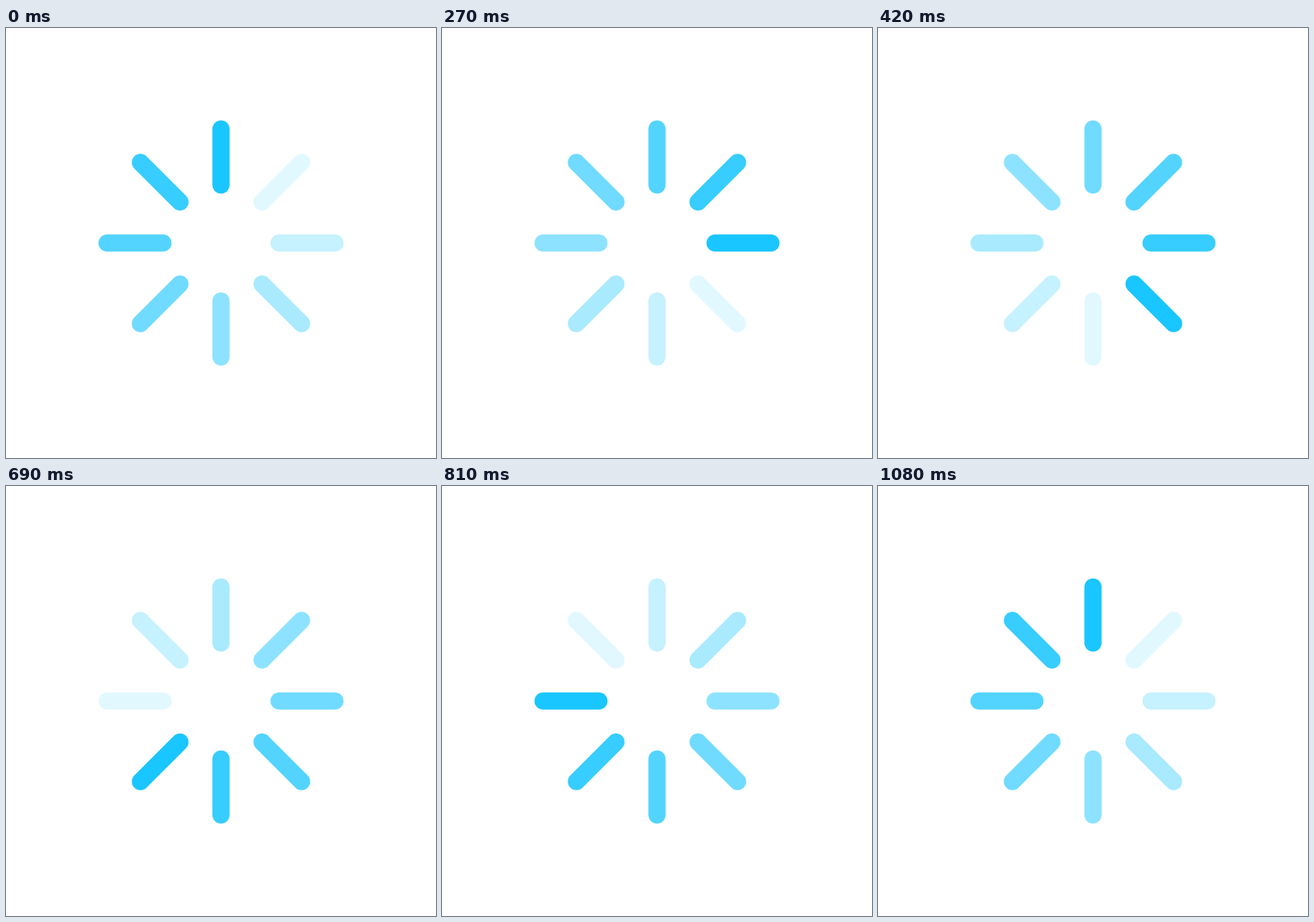
Animation, 640 px wide and 640 px high, one loop 1.14 s. Source, as an HTML page with a canvas:

```html
<!DOCTYPE html>
<html lang="en">
<head>
<meta charset="utf-8">
<title>Spinner</title>
<style>
  html, body { margin: 0; width: 100%; height: 100%; overflow: hidden; background: #fff; }
  canvas { display: block; width: 640px; height: 640px; }
</style>
</head>
<body>
<canvas id="stage" width="640" height="640"></canvas>
<script>
const ctx = document.getElementById('stage').getContext('2d');
const LOOP = 1140;
const BARS = 8;
const STEPS = [150, 270, 420, 540, 690, 810, 960, 1080];
const INNER = 86.4, OUTER = 169.6, WIDTH = 25.6;

// Each bar is the base blue blended over white.
function shade(alpha) {
  const mix = c => Math.round(255 + (c - 255) * alpha);
  return `rgb(${mix(26)}, ${mix(198)}, 255)`;
}

function draw(head) {
  ctx.fillStyle = '#fff';
  ctx.fillRect(0, 0, 640, 640);
  ctx.lineWidth = WIDTH;
  ctx.lineCap = 'round';
  for (let i = 0; i < BARS; i++) {
    const age = (head - i + BARS) % BARS;
    const angle = i * 2 * Math.PI / BARS;
    const dx = Math.sin(angle), dy = -Math.cos(angle);
    ctx.strokeStyle = shade(1 - age / BARS);
    ctx.beginPath();
    ctx.moveTo(320 + dx * INNER, 320 + dy * INNER);
    ctx.lineTo(320 + dx * OUTER, 320 + dy * OUTER);
    ctx.stroke();
  }
}

let start = null;
function tick(now) {
  if (start === null) start = now;
  const t = (now - start) % LOOP;
  draw(STEPS.filter(s => t >= s).length % BARS);
  requestAnimationFrame(tick);
}

draw(0);
requestAnimationFrame(tick);
</script>
</body>
</html>
```
